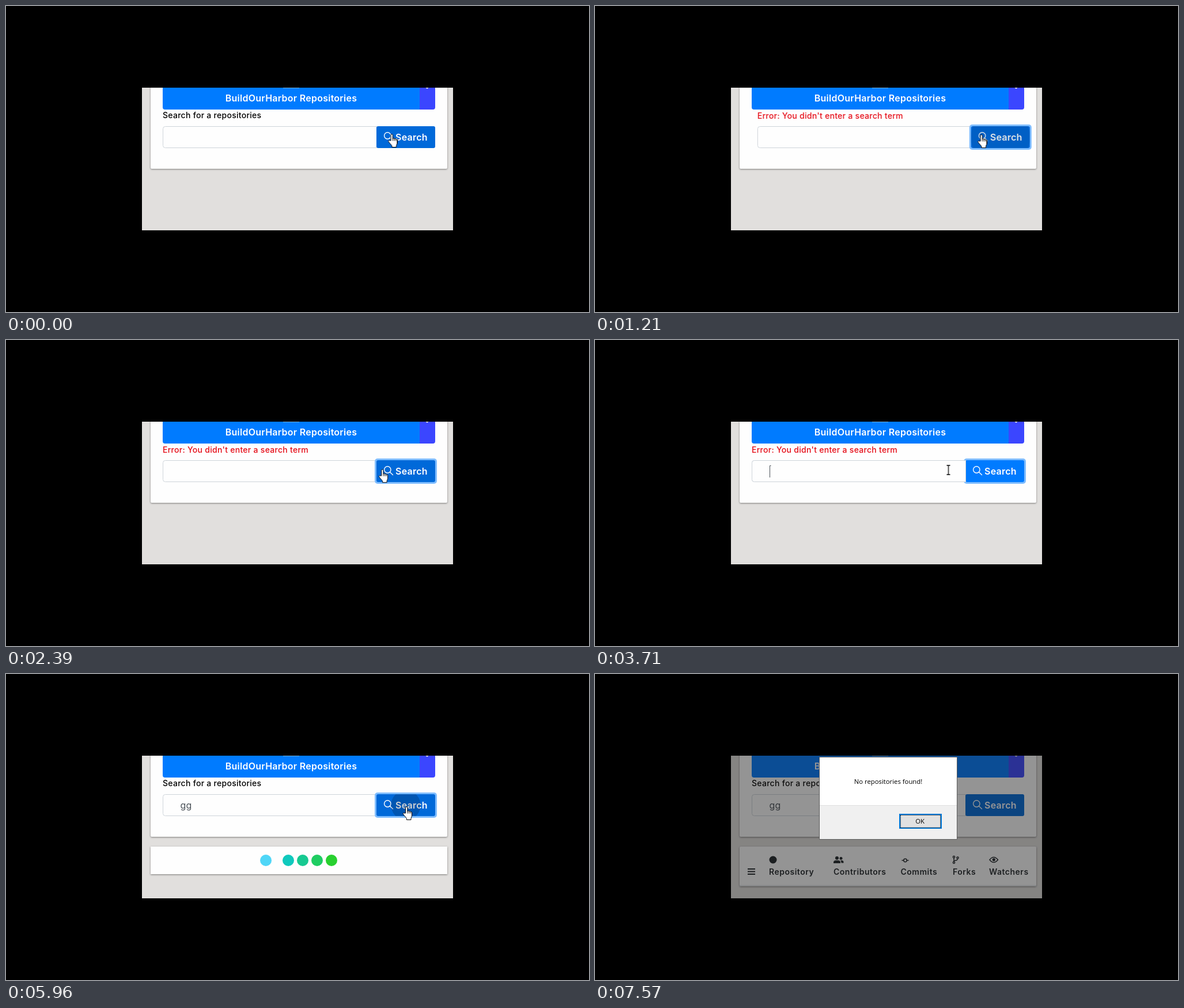
An HTML page that plays this animation: 1012 px wide and 532 px high, repeating every 8 s.

```html
<!DOCTYPE html>
<html lang="en">
<head>
<meta charset="utf-8">
<title>Repository search</title>
<style>
html, body { margin: 0; width: 100%; height: 100%; overflow: hidden; background: #000; }
svg { display: block; }
text { font-family: Inter, "Open Sans", sans-serif; }
.label { font-size: 14px; font-weight: 500; letter-spacing: .28px; }
.btn { font-size: 16px; font-weight: 600; letter-spacing: .25px; fill: #fff; }
.typed { font-size: 16px; fill: #495057; }
.head { font-size: 14px; font-weight: 600; letter-spacing: .5px; }
.win { font-family: "Open Sans", "Noto Sans", sans-serif; font-size: 11.3px; text-anchor: middle; }
.card { fill: #fefefe; filter: drop-shadow(0 1px 1.5px rgba(0, 0, 0, .45)); }

/* One loop is 8 s, so 1% is 80 ms. */
.a { animation: 8s linear infinite; }
.step { animation: 8s step-end infinite; }

.shake { animation-name: shake; animation-timing-function: ease; }
@keyframes shake {
  0%, 7.8125%, 21.375%, 100% { transform: translateX(0); }
  9.0625%, 11.5625%, 14.0625%, 16.5625%, 18.625% { transform: translateX(-10px); }
  10.3125%, 12.8125%, 15.3125% { transform: translateX(10px); }
  17.4375% { transform: translateX(4px); }
}
.ask { animation-name: ask; }
@keyframes ask { 0%, 71.25% { opacity: 1; } 7.8125% { opacity: 0; } }
.error { animation-name: error; }
@keyframes error { 0%, 71.25% { opacity: 0; } 7.8125% { opacity: 1; } }

.face { animation-name: face; }
@keyframes face {
  0%, 31%, 63.3%, 100% { fill: #0069d9; }
  32.9%, 61.4% { fill: #007bff; }
}
.ring { animation-name: ring; }
@keyframes ring {
  0%, 7.125%, 48.25%, 70.5%, 82.6%, 100% { opacity: 0; }
  8.5%, 46.375%, 71.9%, 80.75% { opacity: 1; }
}
.ripple { animation-name: ripple; }
@keyframes ripple {
  0%, 7.125%, 70.5% { transform: scale(0); opacity: .26; }
  19.6%, 83% { transform: scale(80); opacity: 0; }
  19.61%, 83.01%, 100% { transform: scale(0); opacity: 0; }
}
.field { animation-name: field; }
@keyframes field { 0%, 70.5% { opacity: 0; } 46.375% { opacity: 1; } }
.glow { animation-name: glow; }
@keyframes glow { 0%, 46.375% { opacity: 0; } 48.25%, 100% { opacity: 1; } }

.g1 { animation-name: g1; }
@keyframes g1 { 0% { opacity: 0; } 51.75%, 100% { opacity: 1; } }
.g2 { animation-name: g2; }
@keyframes g2 { 0% { opacity: 0; } 55.25%, 100% { opacity: 1; } }
.caret { animation-name: caret; }
@keyframes caret {
  0%, 70.5%, 100% { opacity: 0; transform: none; }
  46.375% { opacity: 1; transform: none; }
  51.75% { opacity: 1; transform: translateX(10px); }
  55.25%, 67.375% { opacity: 1; transform: translateX(20px); }
  61.5% { opacity: 0; transform: translateX(20px); }
}

.loader { animation-name: loader; }
@keyframes loader { 0%, 80% { opacity: 0; } 71.25% { opacity: 1; } }
.swing { animation: swing 1s -.3s infinite; }
.swing.right { animation-name: swing-right; }
@keyframes swing {
  0% { transform: none; animation-timing-function: ease-out; }
  25% { transform: translateX(-14px); animation-timing-function: ease-in; }
  50%, 100% { transform: none; }
}
@keyframes swing-right {
  0%, 50% { transform: none; animation-timing-function: ease-out; }
  75% { transform: translateX(14px); animation-timing-function: ease-in; }
  100% { transform: none; }
}
.table { animation-name: table; }
@keyframes table { 0% { opacity: 0; } 80%, 100% { opacity: 1; } }
.modal { animation-name: modal; }
@keyframes modal { 0%, 80.5% { opacity: 0; } 83.875%, 100% { opacity: 1; } }

.mouse { animation-name: mouse; }
@keyframes mouse {
  0%, .37% { transform: translate(668.5px, 223px); }
  .375%, 25.5% { transform: translate(669.5px, 224px); }
  26.75%, 28.1% { transform: translate(659px, 225px); animation-timing-function: ease-in-out; }
  34.75%, 59% { transform: translate(613.5px, 226px); animation-timing-function: ease-in-out; }
  64.25%, 92% { transform: translate(694px, 231px); }
  94.62%, 100% { transform: translate(735px, 364px); }
}
.hand { animation-name: hand; }
@keyframes hand { 0%, 61.4% { opacity: 1; } 31%, 83%, 100% { opacity: 0; } }
.beam { animation-name: beam; }
@keyframes beam { 0%, 51.75%, 61.4% { opacity: 0; } 31%, 57.125% { opacity: 1; } }
.arrow { animation-name: arrow; }
@keyframes arrow { 0%, 94.625% { opacity: 0; } 83% { opacity: 1; } }
</style>
</head>
<body>
<svg width="1012" height="532" viewBox="0 0 1012 532">
  <defs>
    <clipPath id="view"><path d="M236 142h540v248H236z"/></clipPath>
    <clipPath id="button"><rect x="643" y="209" width="102" height="38" rx="3"/></clipPath>
  </defs>
  <g clip-path="url(#view)">
    <path fill="#e1dfdd" d="M236 142h540v248H236z"/>
    <rect class="card" x="251" y="100" width="515" height="183" rx="2"/>

    <path fill="#007bff" d="M272 142h446v38H276q-4 0-4-4z"/>
    <path fill="#3b46ff" d="M718 142h27v34q0 4-4 4h-23z"/>
    <path fill="#fff" d="M728.5 142h5l-2.500 2z"/>
    <path fill="#6db3fb" d="M481 142h28v1h-28z"/>
    <text class="btn" x="495" y="166" text-anchor="middle">BuildOurHarbor Repositories</text>

    <g class="a shake">
      <text class="label step ask" x="272" y="195">Search for a repositories</text>
      <text class="label step error" x="272" y="196" fill="#e50914">Error: You didn't enter a search term</text>
      <path fill="#fefefe" stroke="#ced4da" d="M643.500 209.500H276.500q-4 0-4 4v29q0 4 4 4h367z"/>

      <rect class="a ring" x="640" y="206" width="108" height="44" rx="5" fill="#7fbdff"/>
      <rect class="a face" x="643" y="209" width="102" height="38" rx="3"/>
      <g fill="none" stroke="#fff" stroke-width="1.4" stroke-linecap="round">
        <circle cx="662.300" cy="225.500" r="5.700"/>
        <path d="M666.500 229.700l5 4.800"/>
      </g>
      <text class="btn" x="676" y="234">Search</text>
      <g clip-path="url(#button)">
        <g transform="translate(694 228)"><circle class="a ripple" r="1"/></g>
      </g>

      <g class="step field">
        <path fill="#fefefe" stroke="#ced4da" d="M643.500 209.500H276.500q-4 0-4 4v29q0 4 4 4h367z"/>
        <g class="a glow">
          <rect x="269" y="206" width="378" height="44" rx="6" fill="#007bff" fill-opacity=".25"/>
          <path fill="#fefefe" stroke="#80bdff" d="M643.500 209.500H276.500q-4 0-4 4v29q0 4 4 4h367z"/>
        </g>
      </g>
      <text class="typed step g1" x="302.500" y="234">g</text>
      <text class="typed step g2" x="312.500" y="234">g</text>
      <path class="step caret" fill="none" stroke="#495057" d="M303.500 239v-20.500h2"/>
    </g>

    <g class="step loader">
      <rect class="card" x="251" y="300" width="515" height="48"/>
      <circle class="swing" cx="465" cy="324" r="10" fill="#4fd6f7"/>
      <circle cx="490" cy="324" r="10" fill="#0fc9bd"/>
      <circle cx="515" cy="324" r="10" fill="#17c991"/>
      <circle cx="540" cy="324" r="10" fill="#1fcd62"/>
      <circle class="swing right" cx="565" cy="324" r="10" fill="#28d02f"/>
    </g>

    <g class="step table" fill="#212529">
      <rect class="card" x="251" y="300" width="515" height="69" rx="2"/>
      <path fill="#dee2e6" d="M251 367h515v1.500H251z"/>
      <path stroke="#212529" stroke-width="1.800" d="M265 339h13m-13 4.500h13m-13 4.500h13"/>
      <circle cx="309" cy="323" r="6.500"/>
      <circle cx="420" cy="320" r="3"/>
      <path d="M414 329v-1.500q0-3.500 4-3.500h4q4 0 4 3.500v1.500z"/>
      <circle cx="427" cy="320.500" r="2.500"/>
      <path d="M426 324h2q3.500 0 3.500 3v1.500h-4q0-3-1.500-4.500z"/>
      <g fill="none" stroke="#212529" stroke-width="1.500">
        <circle cx="538.500" cy="324" r="2.700"/>
        <path d="M532.500 324h3.300m5.400 0h3.300"/>
        <circle cx="623" cy="318.200" r="1.600"/>
        <circle cx="623" cy="327.800" r="1.600"/>
        <circle cx="629.500" cy="319.500" r="1.600"/>
        <path d="M623 320v6m0-1.500q6.500 0 6.500-3.500"/>
        <path d="M685 323q7-9 14.500 0q-7.500 9-14.500 0z"/>
      </g>
      <circle cx="692.300" cy="322.800" r="2.600"/>
      <g class="head">
        <text x="302" y="349">Repository</text>
        <text x="414" y="349">Contributors</text>
        <text x="530.500" y="349">Commits</text>
        <text x="621" y="349">Forks</text>
        <text x="684" y="349">Watchers</text>
      </g>
    </g>

    <g class="a modal">
      <path fill="#1a1a1a" fill-opacity=".46" d="M236 142h540v248H236z"/>
      <path fill="#fff" stroke="#5c5c5c" d="M389.500 144.500h239v143h-239z"/>
      <path fill="#f0f0f0" d="M390 228h238v59H390z"/>
      <path fill="#dfdfdf" d="M390 228h238v1H390z"/>
      <text class="win" x="509" y="191">No repositories found!</text>
      <path fill="#e1e1e1" stroke="#0078d7" stroke-width="2" d="M529 244h72v24h-72z"/>
      <path fill="none" stroke="#000" stroke-dasharray="1 1" d="M530 245.500h70m-.5 0v22m0-.5h-69m0 0v-22"/>
      <text class="win" x="564" y="260">OK</text>
    </g>

    <g class="a mouse">
      <g class="step hand" stroke="#000" stroke-linejoin="round">
        <path fill="#fff" d="M-.5 11V1.500a1.700 1.700 0 0 1 3.400 0V7.500c.8-.9 2.600-.7 2.800.5c.8-.8 2.400-.5 2.600.7c.8-.6 2.200-.2 2.200 1.300V15c0 2.500-1.500 3.500-1.500 5.500v2H1.500v-2C.5 18-2.500 16-4.500 12.700C-5.500 11-3.800 10-2.600 10.900z"/>
        <path fill="none" d="M2.900 7v4.500M5.700 8v3.500M8.300 9v2.500"/>
      </g>
      <path class="step beam" fill="none" stroke="#000" stroke-width="1.300" d="M-3-8h2.300l.7.700.7-.7H3M0-7.300V7.300M-3 8h2.300l.7-.7.7.7H3"/>
      <path class="step arrow" fill="#fff" stroke="#000" d="M-.5-.5v16.500l3.800-3.600 2.400 5.700 2.300-1-2.400-5.500h5.400z"/>
    </g>
  </g>
</svg>
</body>
</html>
```
